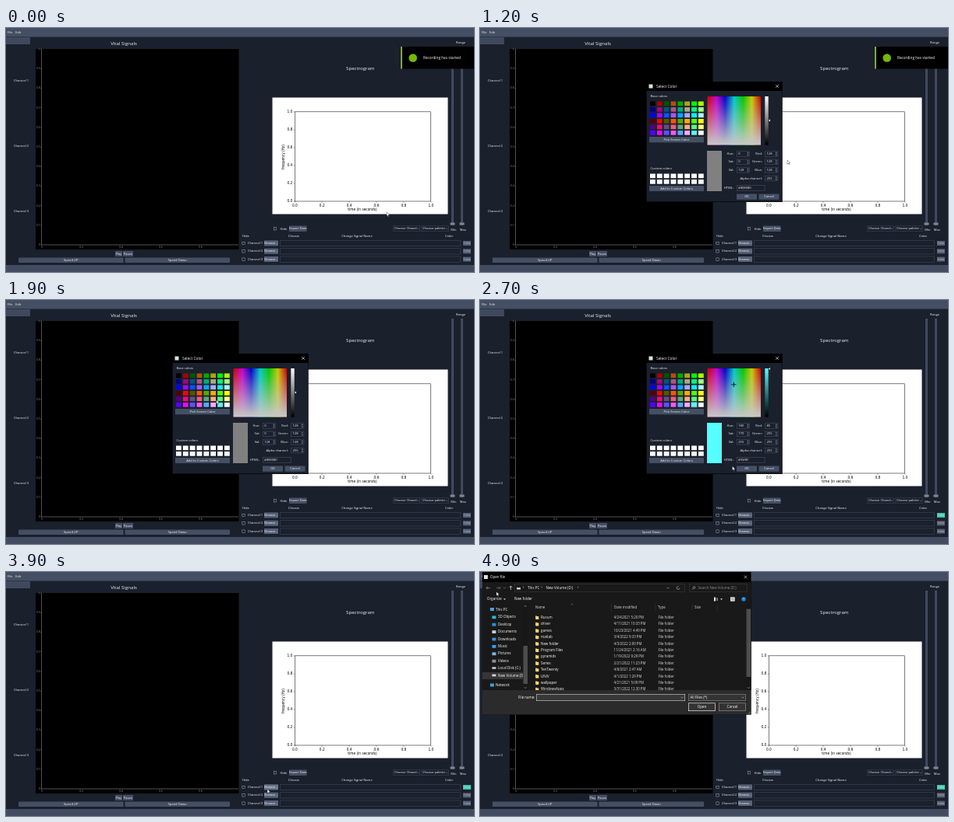
An HTML page with a canvas for the animation above (5000 ms loop, 600 by 314 pixels).

```html
<!DOCTYPE html>
<html lang="en">
<head>
<meta charset="utf-8">
<title>Vital Signals</title>
<style>
html, body { margin: 0; width: 100%; height: 100%; overflow: hidden; background: #1a202c; }
canvas { display: block; width: 600px; height: 314px; }
</style>
</head>
<body>
<canvas id="stage" width="600" height="314"></canvas>
<script>
const c = document.getElementById('stage').getContext('2d');
const UI = '"Open Sans", "Noto Sans", sans-serif', PLOT = '"DejaVu Sans", sans-serif';
const BG = '#1a202c', BTN = '#454f64', LIT = '#566076', INK = '#f4f5f7', LOOP = 5000;

// time, x, y of the pointer tip
const path = [
  [0, 488, 237], [100, 491, 239], [600, 591, 276], [800, 591, 276], [1200, 394, 170],
  [1700, 270, 129], [2300, 269, 128], [2700, 323.5, 214], [2900, 341, 217], [3100, 341, 217],
  [3500, 366, 134], [3600, 366, 134], [3700, 358, 190], [3800, 337, 285], [3900, 335, 279.5],
  [4500, 335, 279.5], [4800, 25, 32], [4900, 21, 25.5]
];

function pointer(t) {
  let i = path.findIndex(k => k[0] > t);
  if (i < 0) return path.at(-1).slice(1);
  const [t0, x0, y0] = path[i - 1], [t1, x1, y1] = path[i];
  let u = (t - t0) / (t1 - t0);
  u = u * u * (3 - 2 * u);
  return [x0 + (x1 - x0) * u, y0 + (y1 - y0) * u];
}

function box(x, y, x2, y2, fill, stroke) {
  if (fill) { c.fillStyle = fill; c.fillRect(x, y, x2 - x, y2 - y); }
  if (stroke) {
    c.strokeStyle = stroke;
    c.lineWidth = 0.6;
    c.strokeRect(x + 0.3, y + 0.3, x2 - x - 0.6, y2 - y - 0.6);
  }
}

function line(color, width, ...pts) {
  c.strokeStyle = color;
  c.lineWidth = width;
  c.beginPath();
  for (let i = 0; i < pts.length; i += 2) c.lineTo(pts[i], pts[i + 1]);
  c.stroke();
}

function poly(color, ...pts) {
  c.fillStyle = color;
  c.beginPath();
  for (let i = 0; i < pts.length; i += 2) c.lineTo(pts[i], pts[i + 1]);
  c.fill();
}

function disc(x, y, r, color) {
  c.fillStyle = color;
  c.beginPath();
  c.arc(x, y, r, 0, 7);
  c.fill();
}

// Set large and scaled down so that small sizes keep exact advances
function text(s, x, y, { size = 4.1, color = INK, align = 'left', font = UI, turn = 0 } = {}) {
  c.save();
  c.translate(x, y);
  c.rotate(turn);
  c.scale(0.1, 0.1);
  c.font = `${size * 10}px ${font}`;
  c.textAlign = align;
  c.textBaseline = 'middle';
  c.fillStyle = color;
  c.fillText(s, 0, 0);
  c.restore();
}

const mid = { align: 'center' }, right = { align: 'right' };

function button(s, x, y, x2, y2, fill = BTN) {
  box(x, y, x2, y2, fill);
  text(s, (x + x2) / 2, (y + y2) / 2, mid);
}

const check = (x, y) => box(x - 2, y - 2, x + 2, y + 2, BG, '#9098a6');
const chevron = (x, y, color = '#bbb') => line(color, 0.6, x - 1.5, y - 0.8, x, y + 0.7, x + 1.5, y - 0.8);
const cross = (x, y) => {
  line('#fff', 0.6, x - 1.8, y - 1.8, x + 1.8, y + 1.8);
  line('#fff', 0.6, x + 1.8, y - 1.8, x - 1.8, y + 1.8);
};

function signalPlot() {
  const gray = '#8c8c8c', small = { size: 3.5, color: gray };
  box(38, 27, 298.5, 285, '#000');
  line(gray, 0.6, 45.5, 27, 45.5, 279, 298, 279);
  for (let i = 0; i <= 10; i++) {
    const y = 279 - i * 25.2, s = String(i / 10);
    line(gray, 0.5, 44.3, y, 45.5, y);
    text(s, 43.8, Math.max(y, 28.5), { ...small, ...right });
    if (i % 2 == 0 && i < 10) text(s, 46 + i * 25.4, 282.5, { ...small, ...mid });
  }
}

function spectrogram() {
  const ink = { color: '#000', size: 4.3, font: PLOT };
  text('Spectrogram', 454.3, 52, { size: 6.1, ...mid });
  box(341.5, 89.5, 566.5, 239.5, '#fff');
  box(370, 107.5, 545, 223.3, null, '#222');
  for (let i = 0; i <= 5; i++) {
    const x = 370.3 + i * 34.9, y = 223 - i * 23, s = (i / 5).toFixed(1);
    line('#222', 0.5, x, 223, x, 224.5);
    line('#222', 0.5, 368.6, y, 370, y);
    text(s, x, 228.5, { ...ink, ...mid });
    text(s, 367.3, y, { ...ink, ...right });
  }
  text('time (in seconds)', 457, 234.3, { ...ink, ...mid });
  text('frequency (Hz)', 355.5, 166, { ...ink, ...mid, turn: -Math.PI / 2 });
}

function mainWindow(picked, px, py) {
  box(0, 0, 600, 314, BG);
  box(0, 0, 600, 11.5, BTN);
  box(0, 12, 31, 21, '#3f495d');
  box(0, 305, 600, 314, '#424c60');
  text('File', 2, 6.3);
  text('Edit', 12, 6.3);
  text('Vital Signals', 151, 20, { size: 6.1, ...mid });
  for (let i = 0; i < 3; i++) text('Channel ' + (i + 1), 10, 67.5 + i * 84);
  signalPlot();
  button('Play', 140, 287, 149, 294);
  button('Pause', 150, 287, 163, 294);
  button('Speed UP', 16, 295.5, 150.5, 302);
  button('Speed Down', 152.5, 295.5, 287, 302);
  spectrogram();

  text('Range', 583, 18.5, mid);
  [['Min', 572.5], ['Max', 584.5]].forEach(([s, x]) => {
    box(x - 1.3, 24, x + 1.3, 254, '#3d4659', '#4d576c');
    box(x - 3, 250.5, x + 3, 253.5, '#7c879b');
    text(s, x + 1.3, 260, mid);
  });

  check(345, 258.3);
  text('Hide', 351.5, 258.5);
  button('Export Data', 363, 254.5, 385.5, 262);
  [['Choose Chanel', 496, 531], ['Choose palette', 532, 568]].forEach(([s, x, x2]) => {
    box(x, 254.5, x2, 262, BG, '#3a4356');
    text(s, x + 2, 258.3);
    chevron(x2 - 3, 258.3, '#788496');
  });
  text('Hide', 303, 268);
  text('Choose', 369, 268, mid);
  text('Change Signal Name', 450, 268, mid);
  text('Color', 568, 268, mid);
  for (let i = 0; i < 3; i++) {
    const y = 277 + i * 10.3;
    const hover = px > 331 && px < 349 && Math.abs(py - y) < 3.6;
    check(304.5, y);
    text('Channel ' + (i + 1), 310, y);
    button('Browse...', 331, y - 3.6, 349, y + 3.4, hover ? '#69748a' : LIT);
    box(351, y - 4, 583, y + 4, BG, '#3d4659');
    const on = picked && i == 0;
    box(586, y - 3, 596, y + 3, on ? '#3fc5ad' : LIT);
    text('Color', 591, y, { size: 3.7, color: on ? '#d8fff6' : '#c4cad4', ...mid });
  }
}

function toast(shift) {
  if (shift >= 94) return;
  c.save();
  c.translate(shift, 0);
  box(506, 24, 600, 52.5, '#000');
  box(506, 24, 508, 52.5, '#76b900');
  disc(521.7, 38.5, 5.3, '#76b900');
  text('Recording has started', 535, 39, { size: 4.7, color: '#fff' });
  c.restore();
}

function fade(x, y, x2, y2, dx, dy, colors) {
  const g = c.createLinearGradient(x, y, dx ? x2 : x, dy ? y2 : y);
  colors.forEach((s, i) => g.addColorStop(i / (colors.length - 1), s));
  box(x, y, x2, y2, g);
}

function spin(label, value, x, y) {
  text(label, x - 3.5, y, right);
  box(x, y - 3.6, x + 17, y + 3.6, BG, BTN);
  text(value, x + 2.2, y);
  poly('#788496', x + 13, y - 0.8, x + 16, y - 0.8, x + 14.5, y - 2.4);
  poly('#788496', x + 13, y + 0.8, x + 16, y + 0.8, x + 14.5, y + 2.4);
}

function colorDialog(picked, pressed) {
  const shade = picked ? '#55ffff' : '#808080';
  box(213, 69, 387.5, 224, BG, '#000');
  box(213, 69, 387.5, 81, '#000');
  box(216.5, 72.5, 221.5, 77.5, '#cfe6e0');
  text('Select Color', 226, 75.3, { size: 4.8, color: '#fff' });
  cross(381, 75);

  text('Base colors', 218.5, 88);
  for (let i = 0; i < 48; i++) {
    const r = (i / 3 | 0) % 4 * 85, g = (i / 12 | 0) * 85, b = i % 3 * 127.5;
    const x = 218 + (i / 6 | 0) * 8.85, y = 94.5 + i % 6 * 7.5;
    box(x, y, x + 6.8, y + 5.7, `rgb(${r},${g},${b | 0})`);
    if (picked && i == 41) box(x - 0.6, y - 0.6, x + 7.4, y + 6.3, null, '#9da9b5');
  }
  button('Pick Screen Color', 217, 140, 287, 147.3);
  text('Custom colors', 218.5, 181);
  for (let i = 0; i < 16; i++) {
    const x = 218 + i % 8 * 8.85, y = 187.5 + (i >> 3) * 7.5;
    box(x, y, x + 6.8, y + 5.7, '#fff');
  }
  button('Add to Custom Colors', 217, 203, 287, 210);

  const hues = [360, 300, 240, 180, 120, 60, 0].map(h => `hsl(${h},100%,39.2%)`);
  fade(291.5, 88, 360, 150.5, 1, 0, hues);
  fade(291.5, 88, 360, 150.5, 0, 1, ['rgba(200,200,200,0)', 'rgb(200,200,200)']);
  if (picked) {
    line('#000', 0.8, 322, 108.8, 328.5, 108.8);
    line('#000', 0.8, 325.3, 105.6, 325.3, 112);
  }
  fade(365.3, 88, 369.7, 150.5, 0, 1, [picked ? '#55ffff' : '#fff', '#000']);
  const y = picked ? 88.5 : 119;
  poly(INK, 370, y, 372, y - 1.6, 372, y + 1.6);

  box(291, 158, 310, 210, shade);
  const hsv = picked ? [180, 170, 255] : [0, 0, 128];
  const rgb = picked ? [85, 255, 255] : [128, 128, 128];
  for (let i = 0; i < 3; i++) {
    const row = 162 + i * 10.4;
    spin(['Hue:', 'Sat:', 'Val:'][i], hsv[i], 329, row);
    spin(['Red:', 'Green:', 'Blue:'][i], rgb[i], 365.3, row);
  }
  spin('Alpha channel:', 255, 365.3, 193.5);
  text('HTML:', 325, 206, right);
  box(329, 202, 365.5, 209.5, BG, BTN);
  text(shade, 331, 206);
  button('OK', 329, 213.5, 355, 220.8, pressed ? '#69748a' : BTN);
  button('Cancel', 357.5, 213.5, 383.5, 220.8);
}

function fileFrame() {
  box(3, 0, 347.5, 183.5, '#000');
  box(5, 4, 10, 9, '#ddd');
  text('Open file', 13, 6.7, { size: 4.5, color: '#fff' });
  cross(340.5, 6.5);
}

function fileBlank() {
  fileFrame();
  box(3, 13, 347.5, 152, '#fff');
  box(3, 41, 61.5, 152, '#131313');
  box(55, 41, 61.5, 152, '#1c1c1c');
  box(55, 95, 61.5, 144, '#4d4d4d');
  chevron(58, 149);
  line('#bbb', 0.6, 56.5, 44.7, 58, 43.2, 59.5, 44.7);
  box(341, 47.5, 347.5, 146, '#1c1c1c');
  box(341, 47.5, 347.5, 135, '#4d4d4d');
  box(3, 152, 347.5, 183, '#333');
  [[49, 158, 70, 164.5], [72, 157, 263, 166], [267, 157, 341, 166],
   [267, 168.5, 302, 179], [306, 168.5, 341, 179], [341, 177, 347.5, 183]].forEach(r => box(...r, '#fff'));
}

const places = ['3D Objects', 'Desktop', 'Documents', 'Downloads', 'Music', 'Pictures', 'Videos',
  'Local Disk (C:)', 'New Volume (D:)'];
const tints = ['#35b5d8', '#2a8fe0', '#c8d0d8', '#3a8ee6', '#3b9ee8', '#7fb7d8', '#8a8fa0', '#c4c4c4', '#d8d8d8'];
const folders = `Rusum,4/24/2021 5:20 PM
driver,4/11/2021 10:33 PM
games,10/23/2021 4:49 PM
matlab,3/4/2022 9:33 PM
New folder,4/3/2022 2:00 PM
Program Files,11/24/2021 2:16 AM
pyramids,1/19/2022 9:29 PM
Series,2/21/2022 11:23 PM
TenTwenty,4/8/2021 2:47 AM
UNIV,4/1/2022 1:29 PM
wallpaper,4/21/2021 5:09 PM
WindowsApps,3/31/2022 12:30 PM`.split('\n').map(s => s.split(','));

function clipped(x, y, x2, y2, draw) {
  c.save();
  c.beginPath();
  c.rect(x, y, x2 - x, y2 - y);
  c.clip();
  draw();
  c.restore();
}

function fileDialog() {
  const t = { size: 4.5, color: '#fff' }, dim = { size: 4.4, color: '#dcdcdc' };
  fileFrame();
  box(3, 13, 347.5, 152, '#191919');
  // navigation bar
  [[10.5, 0, '#999'], [23.5, Math.PI, '#777'], [39.5, Math.PI / 2, '#ddd']].forEach(([x, a, color]) => {
    c.save();
    c.translate(x, 20.5);
    c.rotate(a);
    line(color, 0.7, 2.5, 0, -2.5, 0);
    line(color, 0.7, -0.5, -2, -2.5, 0, -0.5, 2);
    c.restore();
  });
  chevron(31.5, 20.5, '#999');
  box(44, 15, 263, 26, '#191919', '#3a3a3a');
  box(268, 15, 342.5, 26, '#191919', '#3a3a3a');
  box(47, 20, 52, 22.5, '#ccc');
  text('›', 55, 20, t);
  text('This PC', 61, 20.5, t);
  text('›', 78.5, 20, t);
  text('New Volume (D:)', 84.5, 20.5, t);
  text('›', 125, 20, t);
  chevron(241, 20.5);
  c.strokeStyle = '#aaa';
  c.lineWidth = 0.7;
  c.beginPath();
  c.arc(254, 20.5, 1.9, 0, 5.2);
  c.stroke();
  c.beginPath();
  c.arc(274.5, 20, 1.4, 0, 7);
  c.stroke();
  line('#aaa', 0.7, 273.5, 21.1, 272, 22.7);
  text('Search New Volume (D:)', 279.5, 20.5, { size: 4.4, color: '#8c8c8c' });
  // toolbar
  text('Organize', 9, 35, t);
  poly('#ddd', 30, 34.3, 33, 34.3, 31.5, 36);
  text('New folder', 44, 35, t);
  box(300, 32.5, 302, 37.5, '#eee');
  box(303, 33, 305, 37, '#777');
  poly('#ddd', 308, 34.3, 311, 34.3, 309.5, 36);
  box(321, 32.5, 326.5, 37.5, '#bbb', '#eee');
  disc(338, 35, 2.8, '#1683d8');
  text('?', 338, 35, { size: 4.2, color: '#fff', ...mid });

  // sidebar
  clipped(3, 41, 55, 152, () => {
    box(3, 129, 55, 138, '#353535');
    box(13, 46, 18, 50, '#4ca3d8');
    text('This PC', 20, 48.7, t);
    places.forEach((s, i) => {
      const y = 58.3 + i * 9.4;
      box(15.5, y - 1.9, 20.5, y + (i > 6 ? 0.8 : 1.9), tints[i]);
      text(s, 23, y, t);
    });
    box(13, 143.5, 18, 147.5, '#3e9bd6');
    text('Network', 20, 145.7, t);
  });
  box(55.5, 41, 61, 152, '#171717');
  box(55.5, 95, 61, 144, '#4d4d4d');
  chevron(58.2, 149);
  line('#bbb', 0.6, 56.7, 44.7, 58.2, 43.2, 59.7, 44.7);

  // file list
  [['Name', 71], ['Date modified', 172], ['Type', 228], ['Size', 275]].forEach(([s, x]) => text(s, x, 46, dim));
  line('#aaa', 0.5, 116.5, 42, 118, 40.8, 119.5, 42);
  [168.5, 225, 272, 304].forEach(x => line('#3a3a3a', 0.5, x, 41, x, 50));
  clipped(62, 48, 341, 152, () => folders.forEach(([name, date], i) => {
    const y = 58.8 + i * 8.4;
    box(71, y - 2.4, 73, y + 2, '#e8b53a');
    box(72, y - 1.8, 75.3, y + 2.2, '#f6d775');
    text(name, 78, y, t);
    text(date, 171.5, y, dim);
    text('File folder', 228.5, y, dim);
  }));
  box(341, 41, 347.5, 152, '#171717');
  box(341.5, 47.5, 347, 135, '#4d4d4d');
  chevron(344.2, 149);

  // footer
  box(3, 152, 347.5, 183.5, '#2b2b2b');
  text('File name:', 70.5, 161.7, { ...t, ...right });
  box(72, 157, 263, 166, '#383838', '#d0d0d0');
  chevron(259, 161.5);
  box(267, 157, 341, 166, '#333', '#8a8a8a');
  text('All Files (*)', 269.5, 161.7, t);
  chevron(337, 161.5);
  box(267, 168.5, 302, 179, '#333', '#fff');
  text('Open', 284.5, 173.7, { ...t, ...mid });
  box(306, 168.5, 341, 179, '#333', '#9a9a9a');
  text('Cancel', 323.5, 173.7, { ...t, ...mid });
  [[345.5, 181.5], [343.8, 181.5], [345.5, 179.8]].forEach(([x, y]) => box(x, y, x + 0.9, y + 0.9, '#999'));
}

function arrow(x, y) {
  c.save();
  c.translate(x, y);
  c.lineJoin = 'round';
  poly('#fff', 0, 0, 0, 5.1, 1.2, 4, 2, 5.9, 2.8, 5.5, 2, 3.7, 3.7, 3.6);
  line('#222', 0.4, 0, 0, 0, 5.1, 1.2, 4, 2, 5.9, 2.8, 5.5, 2, 3.7, 3.7, 3.6, 0, 0);
  c.restore();
}

function draw(now) {
  const t = Math.floor(now % LOOP / 100) * 100;
  const [x, y] = pointer(t), picked = t >= 2100;
  mainWindow(picked, x, y);
  toast(94 * Math.min(1, Math.max(0, (t - 1300) / 400)) ** 2);
  if (t >= 900 && t < 3200) colorDialog(picked, t >= 2900);
  if (t >= 4700) fileDialog();
  else if (t >= 4400) fileBlank();
  arrow(x, y);
}

const start = performance.now();
(function tick() {
  draw(performance.now() - start);
  requestAnimationFrame(tick);
})();
</script>
</body>
</html>
```
